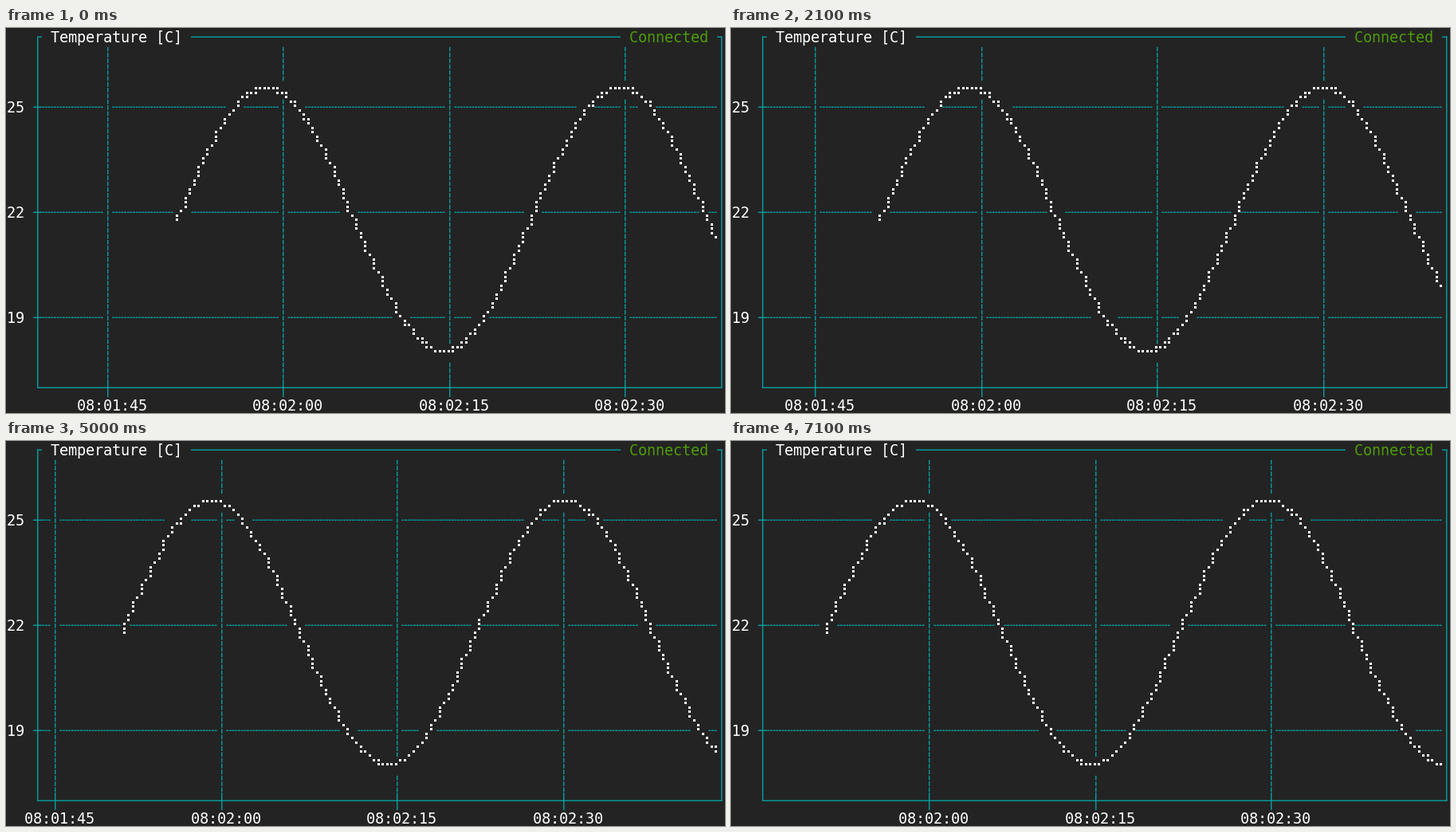
Recreate the animation shown at these times as a matplotlib script. Size 902 by 483 pixels, loop 8 s.

```python
import math

import matplotlib.pyplot as plt
from matplotlib.animation import FuncAnimation
from matplotlib.collections import PolyCollection

W, H, DPI = 902, 483, 64
CW, CH = 11, 22                 # terminal cell
LEFT, RIGHT, BOTTOM = 3, 81, 20  # border columns and axis row
LINE = 1.5
DASH = 0.78                     # drawn share of a dash period
FONT_PX = 14 * 96 / 72
BG, TEAL, GREEN, WHITE = "#232323", "#06989a", "#4e9a06", "#ffffff"

INTERVAL, LOOP = 100, 8000
# time in ms of each redraw, and the dots scrolled by then
SCROLL = [(0, 0), (1100, 2.125), (2100, 5), (4500, 10),
          (5000, 12.5), (6100, 15), (7100, 17.5)]
LEVELS = {4: "25", 10: "22", 16: "19"}
TIMES = ["08:01:45", "08:02:00", "08:02:15", "08:02:30"]
DOT_X = (4, 9)
DOT_Y = (3, 8, 14, 19)
FIRST_DOT, LAST_DOT = 38.85, 161
SAMPLE = 77 / 120               # dots between two readings

fig = plt.figure(figsize=(W / DPI, H / DPI), dpi=DPI, facecolor=BG)
ax = fig.add_axes([0, 0, 1, 1])
ax.set_xlim(0, W)
ax.set_ylim(H, 0)
ax.axis("off")


def rect(x, y, w, h):
    return [(x, y), (x + w, y), (x + w, y + h), (x, y + h)]


def mid_x(col):
    return CW * col + 6


def mid_y(row):
    return CH * row + 10.5


def hline(row, x0, x1):
    return rect(x0, mid_y(row), x1 - x0, LINE)


def vline(col, y0, y1):
    return rect(mid_x(col), y0, LINE, y1 - y0)


def dashes(start, size):
    """Three evenly spaced dashes across one cell."""
    period = size / 3
    gap = period * (1 - DASH)
    for i in range(3):
        a = start + i * period + gap / 2
        yield a, a + period - gap


def text_x(col):
    return CW * col + 0.55      # glyphs then start on whole pixels


def put(col, row, text, color=WHITE):
    """One glyph per terminal cell."""
    return [ax.text(text_x(col + i), CH * row + 17.55, char, color=color,
                    family="DejaVu Sans Mono", size=FONT_PX * 72 / DPI,
                    ha="left", va="baseline")
            for i, char in enumerate(text) if char != " "]


def layer(color, verts=()):
    shapes = PolyCollection(list(verts), facecolors=color, edgecolors="none",
                            linewidths=0, snap=False)
    ax.add_collection(shapes, autolim=False)
    return shapes


def border():
    top, base = mid_y(0), mid_y(BOTTOM)
    x0, x1 = mid_x(LEFT), mid_x(RIGHT) + LINE
    parts = [
        vline(LEFT, top, base + LINE),
        vline(RIGHT, top, base + LINE),
        hline(0, x0, CW * 4 + 1),
        hline(0, CW * 21 + 1, CW * 70 + 1),
        hline(0, CW * RIGHT + 1, x1),
        hline(BOTTOM, x0, x1),
    ]
    parts += [hline(row, CW * LEFT + 1, CW * (LEFT + 1) + 1) for row in LEVELS]
    return parts


def curve_dots(start):
    """Braille dots of a sampled sine joined by Bresenham lines."""
    last = (LAST_DOT + 0.5 - start) / SAMPLE
    samples = list(range(math.floor(last) + 1)) + [last]
    points = [(int(start + n * SAMPLE), int(43.4 - 30.05 * math.sin(n / 20)))
              for n in samples]
    dots = set(points)
    for (x0, y0), (x1, y1) in zip(points, points[1:]):
        dx, dy = x1 - x0, y1 - y0
        n = max(dx, abs(dy))
        for i in range(n):
            dots.add((x0 + (2 * dx * i + n - 1) // (2 * n), y0 + dy * i // n))
    return dots


def dot_rect(x, y):
    return rect(CW * (x // 2) + DOT_X[x % 2], CH * (y // 4) + DOT_Y[y % 4], 3, 3)


def grid_lines(cols, taken):
    parts = []
    for row in LEVELS:
        for col in range(LEFT + 1, RIGHT):
            if col not in cols and (col, row) not in taken:
                parts += [hline(row, a, b) for a, b in dashes(CW * col + 1, CW)]
    for col in cols:
        for row in range(1, BOTTOM):
            if (col, row) not in taken:
                parts += [vline(col, a, b) for a, b in dashes(CH * row + 1, CH)]
        parts.append(vline(col, CH * BOTTOM + 1, CH * (BOTTOM + 1) + 1))
    return parts


layer(TEAL, border())
grid = layer(TEAL)
curve = layer(WHITE)
put(5, 0, "Temperature [C]")
put(71, 0, "Connected", GREEN)
for level_row, level in LEVELS.items():
    put(0, level_row, level)
labels = [put(0, BOTTOM + 1, time) for time in TIMES]


def draw(frame):
    now = frame * INTERVAL
    scroll = max(dots for start, dots in SCROLL if start <= now)
    first = 11.6 - scroll / 2
    cols = [int(first + 19.5 * i) for i in range(len(TIMES))]
    dots = curve_dots(FIRST_DOT - scroll)
    taken = {(x // 2, y // 4) for x, y in dots}

    curve.set_verts([dot_rect(x, y) for x, y in sorted(dots)])
    grid.set_verts(grid_lines([c for c in cols if c > LEFT], taken))
    for label, col in zip(labels, cols):
        for i, glyph in enumerate(label):
            glyph.set_x(text_x(col - 3 + i))
            glyph.set_visible(col > LEFT)
    return [grid, curve]


anim = FuncAnimation(fig, draw, frames=LOOP // INTERVAL, interval=INTERVAL,
                     repeat=True, repeat_delay=0, blit=False)
plt.show()
```
